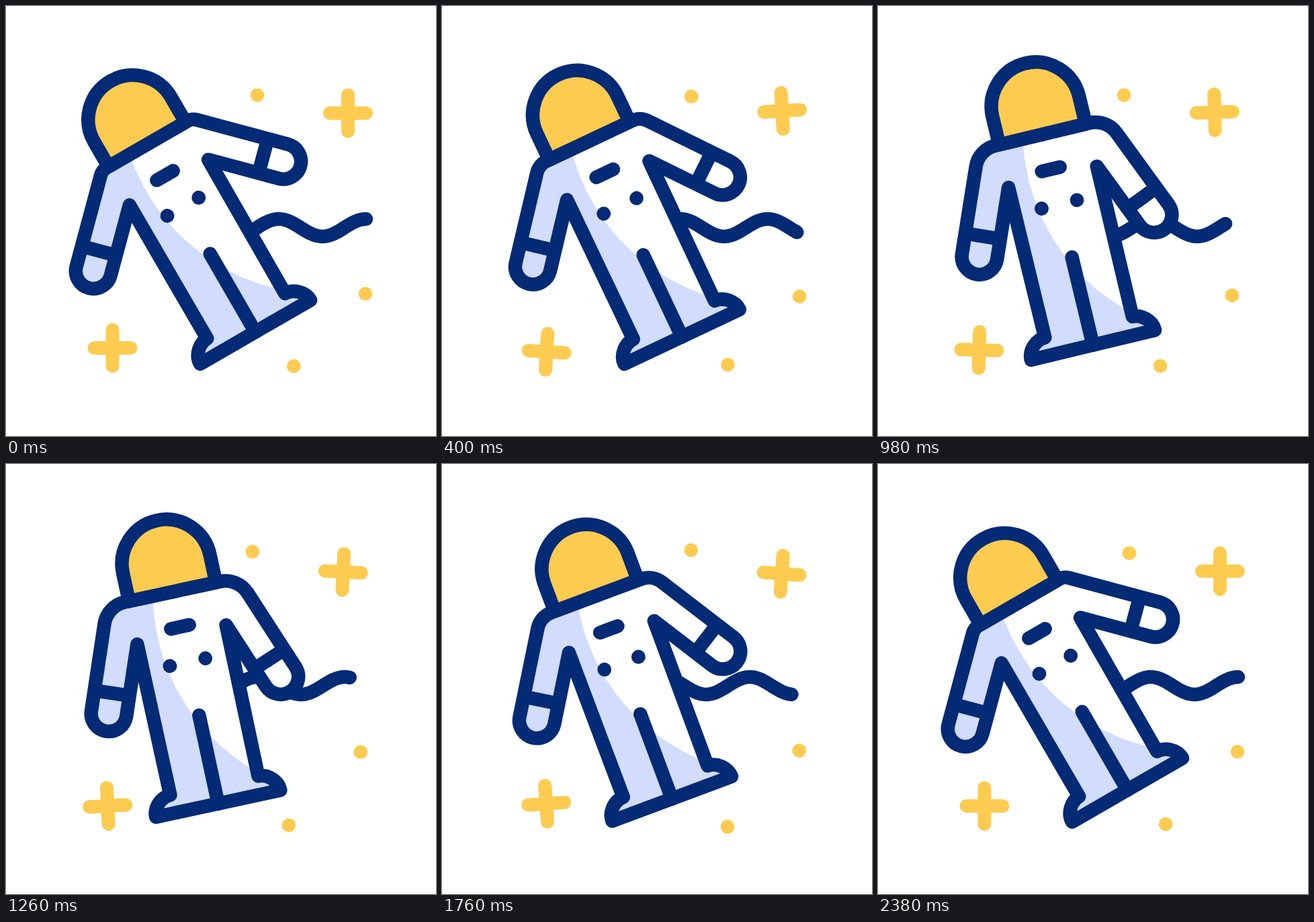
These frames come from a looping animation (640 px wide and 640 px high, 2.4 s). An HTML page:

```html
<!DOCTYPE html>
<html lang="en">
<head>
<meta charset="utf-8">
<title>Floating astronaut</title>
<style>
html, body { margin: 0; width: 100%; height: 100%; overflow: hidden; background: #fff; }
svg { display: block; width: 100vw; height: 100vh; }
.line { fill: none; stroke: #032a75; stroke-width: 20.5; stroke-linecap: round; stroke-linejoin: round; }
.ink { fill: #032a75; }
.dot { fill: #fdcb50; }
.plus { fill: none; stroke: #fdcb50; stroke-width: 20; stroke-linecap: round; }
</style>
</head>
<body>
<svg viewBox="0 0 640 640">
  <defs>
    <path id="half"/>
    <path id="cuff"/>
    <clipPath id="suit">
      <use href="#half"/>
      <use href="#half" transform="scale(-1 1)"/>
    </clipPath>
  </defs>
  <g id="stars"></g>
  <path id="rope" class="line"/>
  <g id="body">
    <g fill="#d2dcfd">
      <use href="#half"/>
      <use href="#half" transform="scale(-1 1)"/>
    </g>
    <g clip-path="url(#suit)"><circle cx="269.7" cy="-72" r="305.5" fill="#fff"/></g>
    <g class="line">
      <use href="#half"/>
      <use href="#half" transform="scale(-1 1)"/>
      <g stroke-linecap="butt">
        <use href="#cuff"/>
        <use href="#cuff" transform="scale(-1 1)"/>
      </g>
      <path d="M0 55.5V190M-14 -79H14"/>
      <path d="M-66.2 -132.5V-175A66.2 66.2 0 0 1 66.2 -175V-132.5Z" fill="#fdcb50"/>
    </g>
    <circle class="ink" cx="-27" cy="-25.3" r="10.4"/>
    <circle class="ink" cx="27" cy="-25.3" r="10.4"/>
  </g>
</svg>
<script>
const LOOP = 2400, SPAN = 2380;
const NECK = -132.5, PIT = [67.7, -67.2], ARM = 108.5, HAND = 26.4;
const $ = id => document.getElementById(id);
const smooth = u => u * u * (3 - 2 * u);
const linear = u => u;

// keys: [time, value] pairs
function track(t, keys, ease = smooth) {
  let i = 1;
  while (i < keys.length - 1 && t > keys[i][0]) i++;
  const [t0, v0] = keys[i - 1], [t1, v1] = keys[i];
  return v0 + (v1 - v0) * ease(Math.min(1, (t - t0) / (t1 - t0)));
}

// x, y, first and second vertical swing, tilt of a plus (0 = dot)
const stars = [
  [509, 159.5, -3.8, 3.8, -5],
  [158.5, 509, 6.2, -3.4, 5],
  [374, 132.7, 2.3, -4.5, 0],
  [535, 428.3, 4.5, -1.7, 0],
  [428.2, 536, -2.2, 3.9, 0]
].map(([x, y, up, down, tilt]) => {
  const el = document.createElementNS('http://www.w3.org/2000/svg', tilt ? 'path' : 'circle');
  el.setAttribute('class', tilt ? 'plus' : 'dot');
  if (tilt) el.setAttribute('d', 'M-27 0H27M0 -27V27');
  else el.setAttribute('r', 10.3);
  $('stars').append(el);
  return { el, x, y, up, down, tilt };
});

function drawStars(t) {
  const dx = track(t, [[0, 0], [1000, -8], [SPAN, 0]]);
  const spin = track(t, [[0, 0], [630, 1], [1530, -1], [SPAN, 0]]);
  for (const s of stars) {
    const dy = track(t, [[0, 0], [500, s.up], [1760, s.down], [SPAN, 0]]);
    s.el.setAttribute('transform',
      `translate(${s.x + dx} ${s.y + dy}) rotate(${s.tilt * spin})`);
  }
}

function drawRope(t) {
  const shift = track(t, [[0, 0], [1350, -26], [SPAN, 0]], linear);
  const end = 536 + shift, phase = 2 * t / SPAN, pts = [];
  for (let x = -192; x <= 0; x += 3) {
    const y = 330 - 13 * Math.cos(2 * Math.PI * (x / 130 + phase));
    pts.push((end + x).toFixed(2) + ' ' + y.toFixed(2));
  }
  $('rope').setAttribute('d', 'M' + pts.join('L'));
}

function drawBody(p) {
  const a = (45 - 24.5 * p) * Math.PI / 180, s = Math.sin(a), c = Math.cos(a);
  // point on the arm: u along it, w across it from the armpit edge
  const arm = (u, w) => [PIT[0] + u * s + w * c, PIT[1] + u * c - w * s];
  const top = arm(0, 2 * HAND);
  const corner = top[0] - (top[1] - NECK) * s / c;
  const cut = 7.5 + (corner - 76.5) * 0.85;
  const r = cut / Math.tan((Math.PI / 2 - a) / 2);
  $('half').setAttribute('d',
    `M-1 ${NECK}H${corner - cut}A${r} ${r} 0 0 1 ${corner + cut * s} ${NECK + cut * c}` +
    `L${arm(ARM, 2 * HAND)}A${HAND} ${HAND} 0 0 1 ${arm(ARM, 0)}L${PIT}` +
    `L67 162.5C80.5 162.5 94.8 175 94.8 190H-1`);
  $('cuff').setAttribute('d', `M${arm(ARM - 31, 0)}L${arm(ARM - 31, 2 * HAND)}`);
  $('body').setAttribute('transform',
    `translate(279 319) rotate(${-30 + 18 * p}) translate(-3.4 0)`);
}

function draw(now) {
  const t = Math.min(now % LOOP, SPAN);
  drawStars(t);
  drawRope(t);
  drawBody(smooth(1 - Math.abs(2 * t / SPAN - 1)));
}

let start;
function tick(now) {
  start ??= now;
  draw(now - start);
  requestAnimationFrame(tick);
}
draw(0);
requestAnimationFrame(tick);
</script>
</body>
</html>
```
